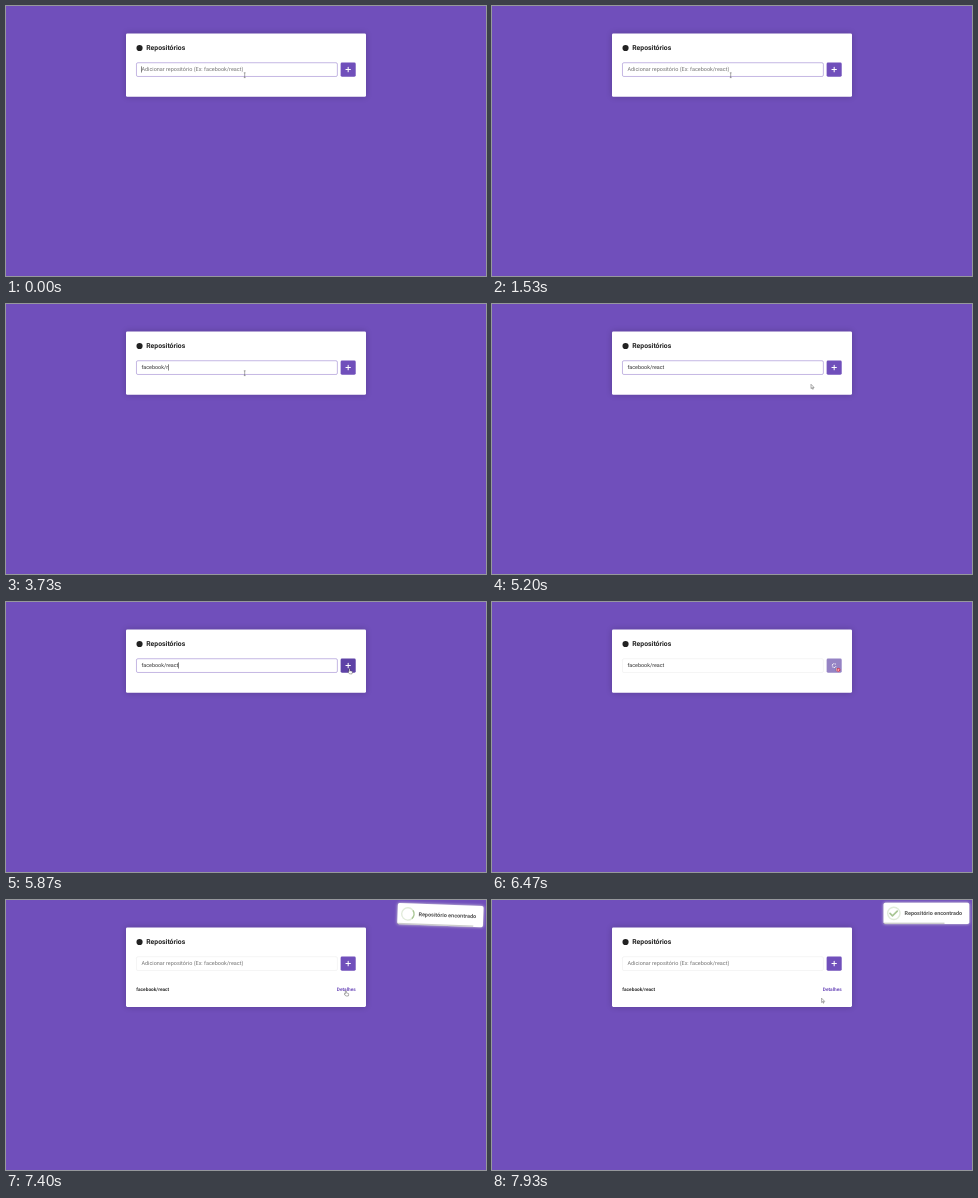
An HTML page that plays this animation: 480x270 px, repeating every 8000 ms.

```html
<!DOCTYPE html>
<html lang="pt">
<head>
<meta charset="utf-8">
<title>Repositórios</title>
<style>
  html, body { margin: 0; width: 100%; height: 100%; overflow: hidden; background: #704fbb; }
  svg { display: block; width: 100vw; height: 100vh; }
  text { font-family: Roboto, "Liberation Sans", sans-serif; text-rendering: geometricPrecision; white-space: pre; }
  .bold { font-weight: 700; }
</style>
</head>
<body>
<svg viewBox="0 0 480 270">
  <defs>
    <filter id="blur" x="-20%" y="-40%" width="140%" height="180%"><feGaussianBlur stdDeviation="10"/></filter>
    <filter id="glow" x="-20%" y="-60%" width="140%" height="220%"><feGaussianBlur stdDeviation="5"/></filter>
  </defs>
  <rect width="480" height="270" fill="#704fbb"/>

  <!-- page laid out at 1400 px wide -->
  <g transform="scale(.342857)">
    <rect class="card" x="350" y="80" width="700" rx="4" opacity=".2" filter="url(#blur)"/>
    <rect class="card" x="350" y="80" width="700" rx="4" fill="#fff"/>
    <circle cx="389.5" cy="122.5" r="9" fill="#222"/>
    <text class="bold" x="409" y="129.3" font-size="20" fill="#222">Repositórios</text>

    <rect id="field" x="380.5" y="165.5" width="586" height="40" rx="4" fill="#fff"/>
    <text id="hint" x="395" y="190.4" font-size="16" fill="#757575">Adicionar repositório (Ex: facebook/react)</text>
    <text id="value" x="395" y="190.4" font-size="15.8" fill="#333"></text>
    <rect id="caret" y="176" width="1.6" height="18" fill="#222"/>

    <g id="button">
      <rect id="face" x="976" y="165" width="44" height="41" rx="4"/>
      <path id="plus" d="M998 179v13M991.5 185.5h13" stroke="#fff" stroke-width="3" stroke-linecap="round"/>
      <g id="spinner" fill="#fff"></g>
    </g>

    <g id="item" font-size="14">
      <text class="bold" x="380" y="264.3" fill="#333">facebook/react</text>
      <text class="bold" x="1020" y="264.3" text-anchor="end" fill="#704fbb">Detalhes</text>
    </g>

    <g id="toast">
      <rect x="1142" y="8" width="250" height="62" rx="5" fill="#d9d9d9" filter="url(#glow)"/>
      <rect x="1142" y="8" width="250" height="62" rx="5" fill="#fff"/>
      <rect id="timer" x="1142" y="66" height="4" fill="#000" opacity=".2"/>
      <g fill="none" stroke="#a9c695" stroke-width="4">
        <circle cx="1172" cy="39" r="18" opacity=".35"/>
        <circle id="arc" cx="1172" cy="39" r="18" pathLength="360"/>
        <path id="check" d="M1161 39.2l7 7.1 14-13.6" pathLength="100" stroke-width="5" stroke-linecap="round" stroke-linejoin="round"/>
      </g>
      <text class="bold" x="1203" y="44.4" font-size="16" fill="#545454">Repositório encontrado</text>
    </g>
  </g>

  <g id="cursor">
    <path data-kind="beam" d="M-.9-2.4h1.8M0-2.4v4.8M-.9 2.4h1.8" stroke="#444" stroke-width=".45"/>
    <path data-kind="arrow" d="M0 0v4.3l1-.9.7 1.6.7-.3-.7-1.5h1.4z" fill="#fff" stroke="#333" stroke-width=".4"/>
    <path data-kind="hand" d="M-.5.4q.5-.8 1 0v1.9l2 .5q.5.2.4.8l-.4 1.8h-2.5l-1.7-2q.1-.8 1.2 0z" fill="#fff" stroke="#333" stroke-width=".4"/>
    <g data-kind="stop">
      <path d="M0 0v3.4l2.4-1z" fill="#fff" stroke="#555" stroke-width=".3"/>
      <circle cx="2.4" cy="2.1" r="1.5" fill="#fff" stroke="#d8203a" stroke-width=".9"/>
      <path d="M1.4 1.1l2 2" stroke="#d8203a" stroke-width=".8"/>
    </g>
  </g>
</svg>
<script>
const LOOP = 8000, SEND = 6270, DONE = 7065;
const WORD = 'facebook/react';
const KEYS = [1930, 2000, 2200, 2270, 2600, 2730, 2800, 2930, 3670, 3730, 3870, 4070, 4200, 4470];
const PATH = [[5000, 238.7, 69.2], [5200, 319, 80.3], [5300, 325, 81], [5800, 343.5, 66.5],
  [6270, 344, 65.8], [6800, 344, 65.8], [7070, 345.2, 71], [7400, 339.8, 90.6], [7600, 337, 92], [7930, 329.6, 98.2]];
const HOVER = [[5600, 0], [5870, 1], [7080, 1], [7300, 0]];
const SWING = [[0, -10, 2], [165, 0, -2], [330, 5, 2], [500, 0, 0]];

const $ = id => document.getElementById(id);
const set = (id, attrs) => { for (const k in attrs) $(id).setAttribute(k, attrs[k]); };
const show = (el, on) => { el.style.display = on ? '' : 'none'; };
const clamp = x => Math.max(0, Math.min(1, x));
const smooth = x => x * x * (3 - 2 * x);

// interpolates the columns of a [time, ...values] table
function at(table, t, ease = x => x) {
  let i = 0;
  while (i < table.length - 2 && t > table[i + 1][0]) i++;
  const a = table[i], b = table[i + 1];
  const p = ease(clamp((t - a[0]) / (b[0] - a[0])));
  return a.slice(1).map((v, n) => v + (b[n + 1] - v) * p);
}
const mix = (a, b, p) => `rgb(${a.map((v, i) => Math.round(v + (b[i] - v) * p))})`;

for (let i = 0; i < 7; i++) {
  const dot = document.createElementNS('http://www.w3.org/2000/svg', 'circle');
  const a = i * Math.PI / 4;
  const attrs = { cx: 5.6 * Math.cos(a), cy: 5.6 * Math.sin(a), r: 1.6 };
  for (const k in attrs) dot.setAttribute(k, attrs[k]);
  $('spinner').append(dot);
}

function drawField(t) {
  const focus = t < SEND, done = t >= DONE;
  const typed = KEYS.filter(k => k <= t).length;
  const text = done ? '' : WORD.slice(0, typed);
  if ($('value').textContent !== text) $('value').textContent = text;
  show($('hint'), !text);
  set('field', { stroke: focus ? '#704fbb' : '#e4e4e4', 'stroke-width': 1.2 });

  // the blink restarts with each key
  const since = t - (typed ? KEYS[typed - 1] : -60);
  show($('caret'), focus && Math.floor(since / 530) % 2 === 0);
  set('caret', { x: 395 + (text ? $('value').getComputedTextLength() : 0) });
}

function drawButton(t) {
  const busy = t >= SEND && t < DONE;
  set('face', { fill: mix([112, 79, 187], [94, 66, 166], at(HOVER, t)[0]) });
  set('button', { opacity: busy ? .65 : 1 });
  set('spinner', { transform: `translate(998 185.5) rotate(${(t - SEND) * .18})` });
  show($('plus'), !busy);
  show($('spinner'), busy);
}

function drawToast(t) {
  const s = t - DONE, on = s >= 0;
  show($('toast'), on);
  show($('item'), on);
  document.querySelectorAll('.card').forEach(c => c.setAttribute('height', on ? 232 : 185));
  if (!on) return;
  const [dy, tilt] = at(SWING, s, smooth);
  set('toast', { transform: `translate(0 ${dy}) rotate(${tilt} 1267 39)` });
  set('timer', { width: 250 * (1 - s / 3000) });

  const turn = 360 * clamp((s - 212) / 298) ** 1.7;
  const from = turn < 180 ? 45 - turn : -135;
  const span = turn < 180 ? turn : 360 - turn;
  set('arc', { 'stroke-dasharray': `${span} 360`, transform: `rotate(${from} 1172 39)` });
  show($('arc'), span > 0);

  const drawn = clamp((s - 405) / 300);
  set('check', { 'stroke-dasharray': `${100 * drawn} 200` });
  show($('check'), drawn > 0);
}

function cursorKind(x, y, t) {
  const inRow = y > 56 && y < 71.5;
  if (inRow && x < 331) return 'beam';
  if (inRow && x > 335) return t >= SEND && t < DONE ? 'stop' : 'hand';
  return t > DONE && x > 331 && y > 86 && y < 92.5 ? 'hand' : 'arrow';
}

function drawCursor(t) {
  const [x, y] = at(PATH, t, smooth);
  const kind = cursorKind(x, y, t);
  set('cursor', { transform: `translate(${x} ${y})` });
  for (const el of $('cursor').children) show(el, el.dataset.kind === kind);
}

function frame() {
  const t = performance.now() % LOOP;
  drawField(t);
  drawButton(t);
  drawToast(t);
  drawCursor(t);
  requestAnimationFrame(frame);
}
frame();
</script>
</body>
</html>
```
